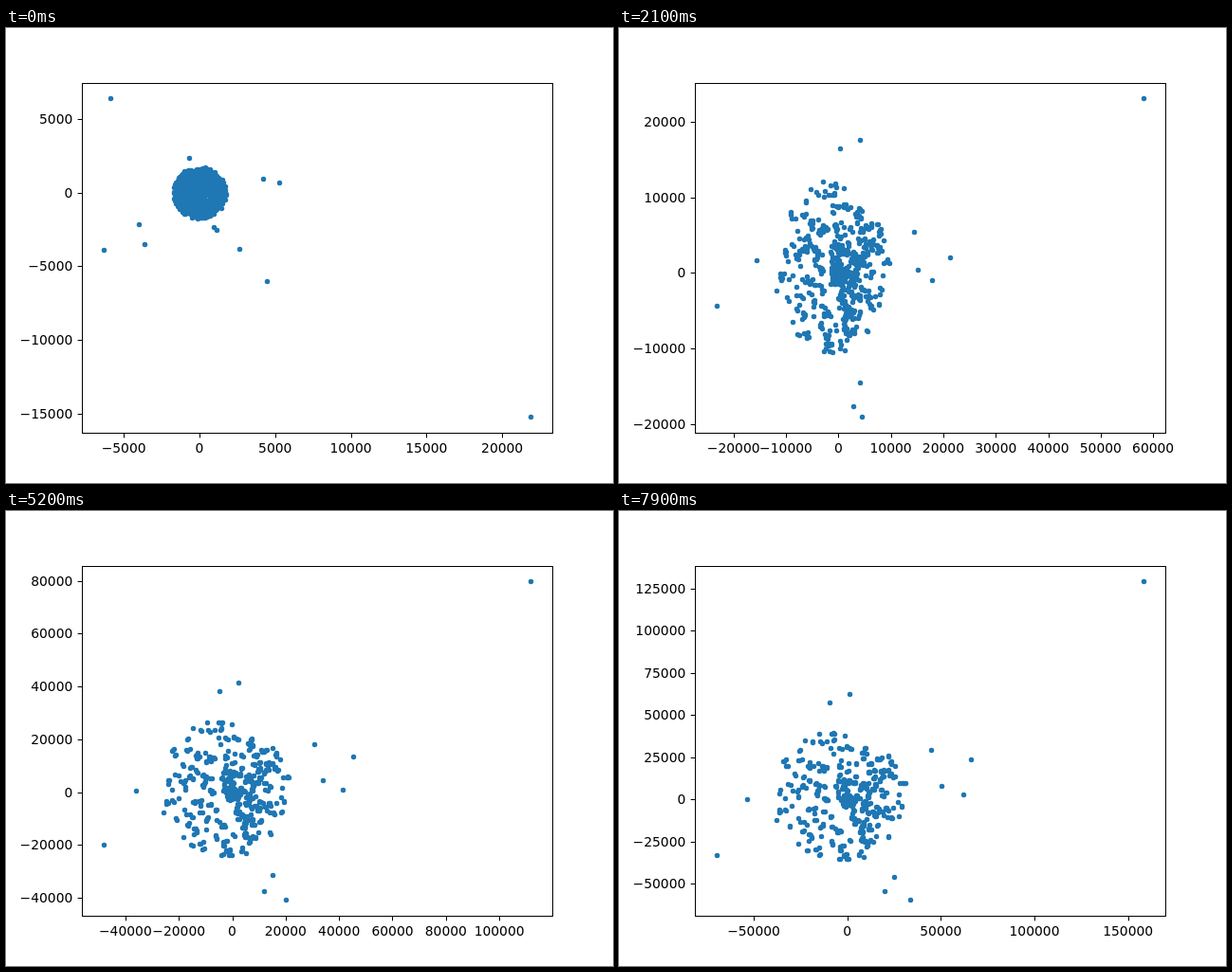
Animation of 640 by 480 pixels, one loop 8 s. Source, as an HTML page with a canvas:

```html
<!DOCTYPE html>
<html lang="en">
<head>
<meta charset="utf-8">
<title>Scatter plot</title>
<style>
  html, body { margin: 0; width: 100%; height: 100%; overflow: hidden; background: #fff; }
  canvas { display: block; width: 640px; height: 480px; }
</style>
</head>
<body>
<canvas id="plot" width="640" height="480"></canvas>
<script>
const ctx = document.getElementById('plot').getContext('2d');
const BOX = { left: 80, right: 576, top: 57.6, bottom: 427.2 };
const STEP_MS = 100, STEPS = 80, LAST = STEPS - 1;

// Lengths are in thousands of axis units
const DISC = 1.76;              // radius of the starting disc
const SWIRL = 3;                // sideways offset of the paths at the rim
const LAG = 58 * Math.PI / 180; // the disc spins: the offset trails the heading
const SETTLE = 10;              // steps a body needs to settle on its path

// Lone bodies: start x, y and last x, y
const escapers = [
  [21.9, -15.25, 158.5, 129],
  [-5.9, 6.4, -70, -33.1],
  [5.27, .68, 1, 62.4],
  [4.2, .94, -9.6, 57.3],
  [-6.35, -3.9, 33.5, -59.6],
  [-3.64, -3.5, 19.8, -54.5],
  [-4, -2.16, 24.85, -46.1],
  [4.45, -6, 65.9, 23.6],
  [2.63, -3.8, 44.6, 29.2],
  [1.13, -2.55, 50.2, 7.9],
  [.95, -2.35, 61.9, 2.8],
  [-.7, 2.35, -53.5, 0]
];

let seed = 20;
function rnd() {
  seed = (seed + 0x6D2B79F5) | 0;
  let t = Math.imul(seed ^ (seed >>> 15), 1 | seed);
  t = (t + Math.imul(t ^ (t >>> 7), 61 | t)) ^ t;
  return ((t ^ (t >>> 14)) >>> 0) / 4294967296;
}
const spread = s => (rnd() + rnd() - 1) * s;
const turn = () => 2 * Math.PI * rnd();
const polar = (r, a) => [r * Math.cos(a), r * Math.sin(a)];

const bodies = [];

// A body slides from its start onto the straight path from origin to end
function addBody(start, origin, end) {
  const path = [0, 1].map(i => ({
    origin: origin[i],
    speed: (end[i] - origin[i]) / LAST,
    slip: start[i] - origin[i]
  }));
  bodies.push(path);
}

// Bodies that start anywhere in the disc and gather on one path
function addGroup(end, swirl, count) {
  const origin = polar(swirl, Math.atan2(end[1], end[0]) - LAG);
  for (let i = 0; i < count; i++) {
    const dx = spread(.7), dy = spread(.7);
    addBody(polar(DISC * Math.sqrt(rnd()), turn()),
      [origin[0] + dx, origin[1] + dy], [end[0] + dx, end[1] + dy]);
  }
}

for (const [x0, y0, x1, y1] of escapers) {
  const dx = x1 - x0, dy = y1 - y0, length = Math.hypot(dx, dy);
  const push = .6 / (length / LAST) ** 2; // slower bodies brake more
  addBody([x0, y0], [x0 + dx / length * push, y0 + dy / length * push], [x1, y1]);
}

for (let i = 0; i < 230; i++) {
  const reach = Math.pow(rnd(), .62), [x, y] = polar(reach, turn());
  addGroup([36 * x - 4 * reach, 39 * y + 2 * reach], SWIRL * reach,
    1 + Math.floor(rnd() * (6.5 - 4.5 * reach)));
}

for (let i = 0; i < 26; i++) addGroup(polar(4 * rnd(), turn()), 1.3 * rnd(), 5);

function positions(n) {
  const decay = Math.exp(-n / SETTLE);
  return bodies.map(path => path.map(p => p.origin + p.speed * n + p.slip * decay));
}

// Axis fitted to the values with a 5% margin and at most nine intervals
function makeAxis(values, from, to) {
  const min = Math.min(...values), max = Math.max(...values);
  const pad = (max - min) * .05;
  const lo = min - pad, hi = max + pad;
  const raw = (hi - lo) / 9;
  const unit = 10 ** Math.floor(Math.log10(raw));
  const step = unit * [1, 2, 2.5, 5, 10].find(s => s * unit >= raw);
  const ticks = [];
  for (let i = Math.ceil(lo / step); i * step <= hi; i++) ticks.push(i * step);
  return { ticks, at: v => from + (v - lo) / (hi - lo) * (to - from) };
}

const snap = v => Math.floor(v + .5) + .5;
const label = v => String(Math.round(v * 1000)).replace('-', '\u2212');

function line(x1, y1, x2, y2) {
  ctx.beginPath();
  ctx.moveTo(x1, y1);
  ctx.lineTo(x2, y2);
  ctx.stroke();
}

function draw(n) {
  const points = positions(n);
  const xAxis = makeAxis(points.map(p => p[0]), BOX.left, BOX.right);
  const yAxis = makeAxis(points.map(p => p[1]), BOX.bottom, BOX.top);
  const left = snap(BOX.left), right = snap(BOX.right);
  const top = snap(BOX.top), bottom = snap(BOX.bottom);

  ctx.fillStyle = '#fff';
  ctx.fillRect(0, 0, 640, 480);

  ctx.fillStyle = '#1f77b4';
  ctx.beginPath();
  for (const [px, py] of points) {
    const x = snap(xAxis.at(px)), y = snap(yAxis.at(py));
    ctx.moveTo(x + 2.75, y);
    ctx.arc(x, y, 2.75, 0, 2 * Math.PI);
  }
  ctx.fill();

  ctx.strokeStyle = ctx.fillStyle = '#000';
  ctx.lineWidth = 1;
  ctx.strokeRect(left, top, right - left, bottom - top);
  ctx.font = '13.89px "DejaVu Sans", sans-serif';
  ctx.textBaseline = 'alphabetic';

  ctx.textAlign = 'center';
  for (const v of xAxis.ticks) {
    const x = xAxis.at(v);
    line(snap(x), bottom, snap(x), bottom + 4.86);
    ctx.fillText(label(v), x, 448);
  }
  ctx.textAlign = 'right';
  for (const v of yAxis.ticks) {
    const y = yAxis.at(v);
    line(left - 4.86, snap(y), left, snap(y));
    ctx.fillText(label(v), 70.3, Math.round(y + 5));
  }
}

const start = performance.now();
let shown = -1;
function tick() {
  const n = Math.floor((performance.now() - start) / STEP_MS) % STEPS;
  if (n !== shown) draw(shown = n);
  requestAnimationFrame(tick);
}
tick();
</script>
</body>
</html>
```
